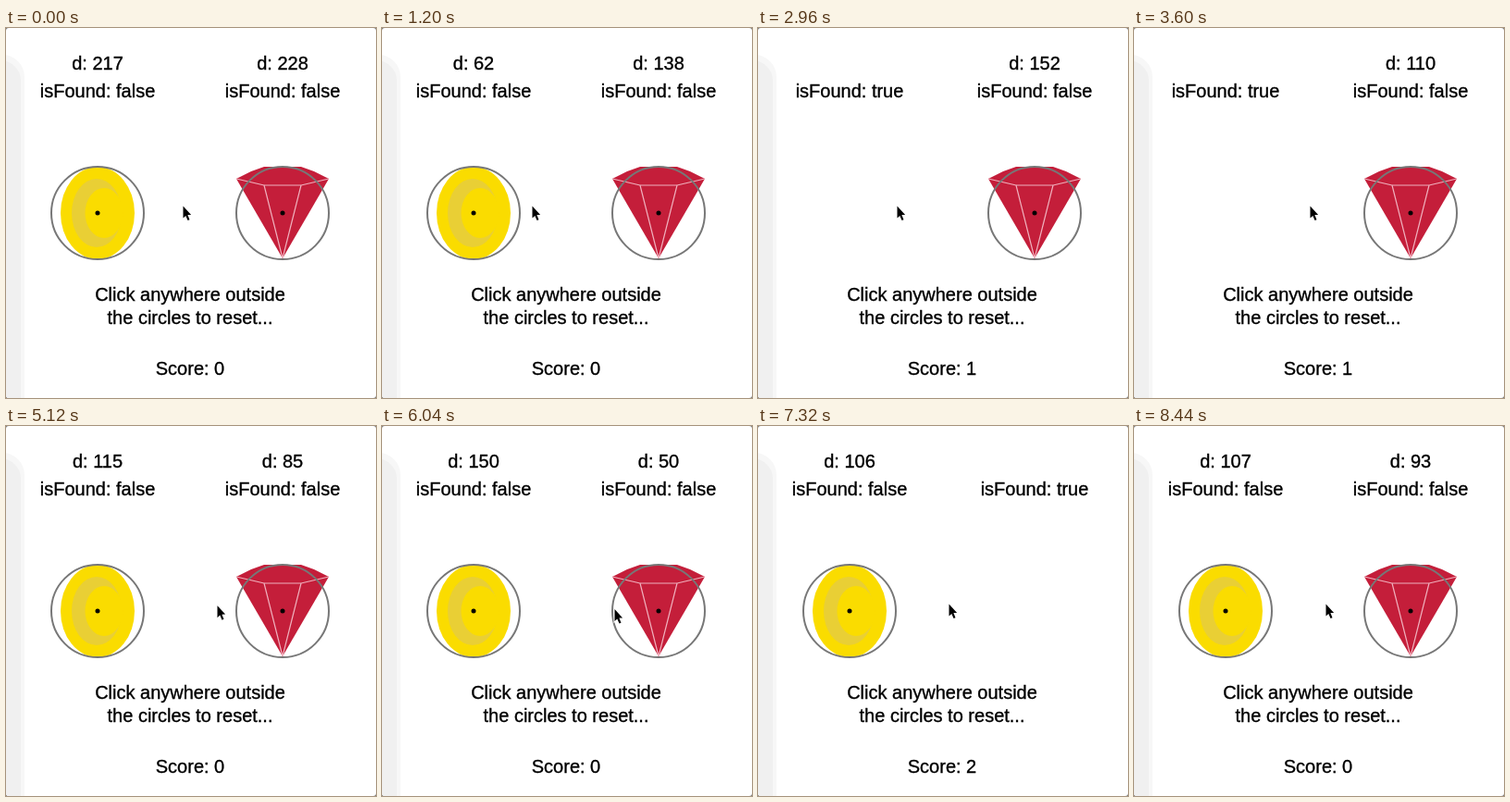
Animation of 400 by 400 pixels, one loop 9 s. Source, as an HTML page with a canvas:

```html
<!DOCTYPE html>
<html lang="en">
<head>
<meta charset="utf-8">
<title>Find the treasure</title>
<style>
html, body { margin: 0; width: 100%; height: 100%; overflow: hidden; background: #fff; }
canvas { display: block; width: 400px; height: 400px; }
</style>
</head>
<body>
<canvas id="stage"></canvas>
<script>
const LOOP = 9000, TICK = 40, PRESS = 120, RADIUS = 50, MID = 200;
const canvas = document.getElementById('stage');
const ratio = window.devicePixelRatio || 1;
canvas.width = canvas.height = 400 * ratio;
const ctx = canvas.getContext('2d');
ctx.scale(ratio, ratio);

const HOME = 191;
// eased pointer moves: start, end, new x
const moves = [
  [720, 1160, 162], [1160, 1640, 151], [2280, 2320, 147],
  [2840, 3560, 190], [3560, 4040, 215],
  [5080, 5120, 228], [5120, 5360, 238], [5480, 6160, 252],
  [6480, 7320, 206], [8360, 8400, 207]
];
const presses = [40, 2320, 4520, 6200, 7720];

const coin = { x: 99, reach: 100, points: 1, stale: 217, draw: drawCoin };
const gem = { x: 299, reach: 300, points: 2, stale: 228, draw: drawGem };
const items = [coin, gem];

const ease = u => u * u * (3 - 2 * u);

function pointerX(t) {
  let x = HOME;
  for (const [from, to, goal] of moves) {
    const u = Math.min(1, Math.max(0, (t - from) / (to - from)));
    x += (goal - x) * ease(u);
  }
  return Math.round(x);
}

// the path dips slightly near the gem
const pointerY = x => 192 + Math.max(0, x - 218) / 6;

const distance = (item, x) => Math.abs(item.reach - x);

// a press on an item finds it, a press elsewhere resets
function foundAt(t) {
  let found = null;
  for (const p of presses) {
    if (p > t) break;
    found = items.find(item => distance(item, pointerX(p)) < RADIUS) || null;
  }
  return found;
}

function trace(points) {
  ctx.beginPath();
  points.forEach(([x, y]) => ctx.lineTo(x, y));
}

function fillShape(points, color) {
  trace(points);
  ctx.fillStyle = color;
  ctx.fill();
}

function strokeShape(points, color, width) {
  trace(points);
  ctx.strokeStyle = color;
  ctx.lineWidth = width;
  ctx.stroke();
}

function oval(x, y, rx, ry, color) {
  ctx.beginPath();
  ctx.ellipse(x, y, rx, ry, 0, 0, Math.PI * 2);
  ctx.fillStyle = color;
  ctx.fill();
}

function ring(x, y, r, color) {
  ctx.beginPath();
  ctx.arc(x, y, r, 0, Math.PI * 2);
  ctx.strokeStyle = color;
  ctx.lineWidth = 2;
  ctx.stroke();
}

function panel(x, y, w, h, r, color) {
  ctx.beginPath();
  ctx.roundRect(x, y, w, h, r);
  ctx.fillStyle = color;
  ctx.fill();
}

function label(text, x, y) {
  ctx.fillStyle = ctx.strokeStyle = '#000';
  ctx.lineWidth = 0.35;
  ctx.fillText(text, x, y);
  ctx.strokeText(text, x, y);
}

function backdrop() {
  ctx.fillStyle = '#777';
  ctx.fillRect(0, 0, 400, 400);
  panel(0, 0, 400, 400, 3, '#fff');
  ctx.save();
  ctx.beginPath();
  ctx.roundRect(0, 0, 400, 400, 3);
  ctx.clip();
  panel(-60, 29, 80, 420, 24, '#f7f7f7');
  panel(-60, 35, 76, 420, 22, '#f0f0f0');
  ctx.restore();
}

function drawCoin(x) {
  oval(x, MID, 40, 50, '#fadc00');
  oval(x - 1, MID, 27, 37, '#e9cf35');
  oval(x + 7, MID, 20.5, 27, '#fadc00');
}

function drawGem(x) {
  const left = [x - 50, 163], right = [x + 50, 163], tip = [x, 249];
  const a = [x - 20, 170], b = [x + 20, 170];
  fillShape([left, [x - 34, 155], [x - 20, 150], [x + 20, 150], [x + 34, 155], right, tip], '#c41e3a');
  strokeShape([left, a, b, right], '#f0b0bd', 1.2);
  strokeShape([a, tip, b], '#f0b0bd', 1.2);
}

function drawItem(item, found, d) {
  label('isFound: ' + found, item.x, 75);
  if (found) return;
  label('d: ' + d, item.x, 45);
  item.draw(item.x);
  ring(item.x, MID, RADIUS, '#777');
  oval(item.x, MID, 2.5, 2.5, '#000');
}

function cursor(x, y) {
  const arrow = [[0, 0], [0, 13], [2.8, 10.4], [5, 15.6], [7, 14.7], [4.9, 9.6], [8.6, 9.4], [0, 0]];
  ctx.save();
  ctx.translate(x + 0.5, y + 0.5);
  strokeShape(arrow, '#fff', 2);
  fillShape(arrow, '#000');
  ctx.restore();
}

function render(t) {
  const x = pointerX(t), y = pointerY(x);
  const read = pointerX(t - TICK);  // readouts trail the pointer by a tick
  const found = foundAt(t);
  const idle = t <= moves[0][0];

  backdrop();
  ctx.font = '20px "Liberation Sans", Helvetica, Arial, sans-serif';
  ctx.textAlign = 'center';
  ctx.textBaseline = 'alphabetic';

  for (const item of items) {
    drawItem(item, item === found, idle ? item.stale : distance(item, read));
  }
  label('Click anywhere outside', 199, 295);
  label('the circles to reset...', 199, 320);
  label('Score: ' + (found ? found.points : 0), 199, 375);

  if (presses.some(p => t >= p && t < p + PRESS)) {
    ring(x, y + 1, 21.5, 'rgba(60,60,60,.7)');
  }
  cursor(x, y);
}

const start = performance.now();
function loop() {
  const t = (performance.now() - start) % LOOP;
  render(Math.floor(t / TICK) * TICK);
  requestAnimationFrame(loop);
}
loop();
</script>
</body>
</html>
```
